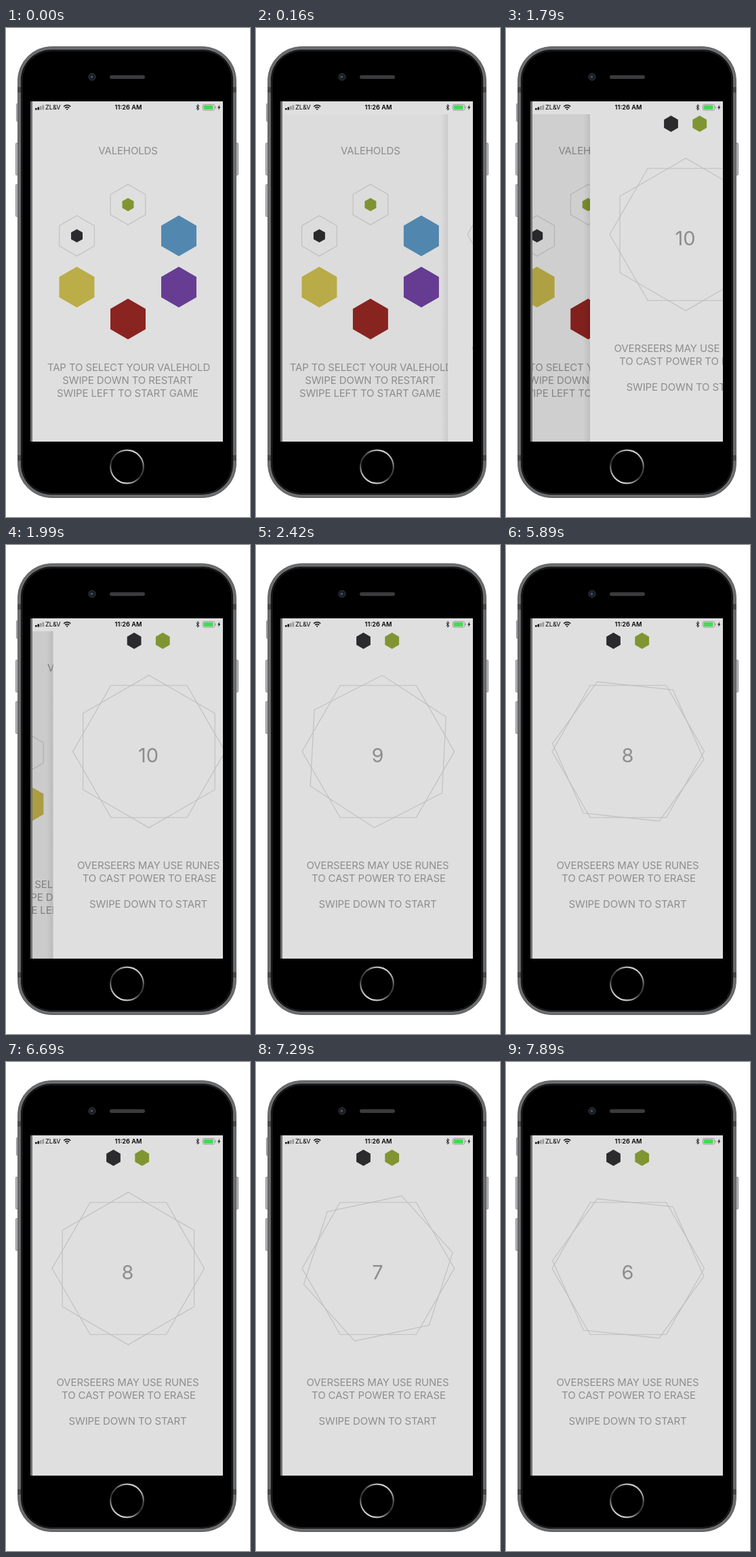
Animation of 360 by 720 pixels, one loop 7990 ms. Source, as an HTML page:

```html
<!DOCTYPE html>
<html lang="en">
<head>
<meta charset="utf-8">
<title>Hex game on a phone</title>
<style>
  html, body { margin: 0; width: 100%; height: 100%; overflow: hidden; background: #fff; }
  svg { display: block; }
  text { font-family: Inter, Roboto, sans-serif; }
  .page text { font-size: 15px; letter-spacing: -.13px; fill: #8d8d8d; text-anchor: middle; }
  .page text.count { font-size: 29px; letter-spacing: 0; }
  .page polygon[fill=none] { stroke: #bebebe; stroke-width: 1.1; }
</style>
</head>
<body>
<svg width="360" height="720" viewBox="0 0 360 720">
  <defs>
    <clipPath id="view"><rect x="39" y="127" width="281" height="482"/></clipPath>
    <linearGradient id="shade"><stop stop-opacity="0"/><stop offset="1" stop-opacity=".08"/></linearGradient>
    <linearGradient id="ring" x1=".75" y1="0" x2=".25" y2="1">
      <stop stop-color="#e4e4e4"/><stop offset=".35" stop-color="#4a4a4a"/>
      <stop offset=".6" stop-color="#333"/><stop offset="1" stop-color="#eee"/>
    </linearGradient>
  </defs>

  <!-- phone -->
  <g fill="#b4b4b6" stroke="#77787a" stroke-width=".8">
    <rect x="15.4" y="111.5" width="5" height="26" rx="1"/>
    <rect x="14.4" y="169.5" width="6" height="47" rx="1"/>
    <rect x="14.4" y="230.5" width="6" height="47" rx="1"/>
    <rect x="336" y="169.5" width="6.6" height="47" rx="1"/>
  </g>
  <rect x="17.5" y="27.5" width="322" height="664" rx="50" fill="#6b6c6e" stroke="#5c5d5f"/>
  <path d="M17 87h5v8h-5zM335 87h5v8h-5zM17 629h5v8h-5zM335 629h5v8h-5z" fill="#48494b"/>
  <rect x="22" y="32" width="313" height="655" rx="45"/>
  <rect x="23.5" y="33.5" width="310" height="652" rx="43.5" stroke="#303133"/>
  <circle cx="127" cy="72" r="5" fill="#17191d" stroke="#3d3f43"/>
  <circle cx="126.5" cy="72" r="2" fill="#37506f"/>
  <rect x="153" y="69.5" width="52" height="5.5" rx="2.7" fill="#3b3b3d"/>
  <circle cx="178.5" cy="646" r="24.3" fill="none" stroke="url(#ring)" stroke-width="2.2"/>
  <rect x="36" y="108" width="284" height="501" fill="#dfdfdf"/>
  <rect x="36" y="108" width="3" height="501" fill="#707070"/>

  <!-- status bar -->
  <path d="M43 118h2.6v2.5H43zM46.5 116.5h2.6v4h-2.6z" fill="#111"/>
  <path d="M50 115h2.6v5.5H50zM53.5 113.5h2.6v7h-2.6z" fill="#999"/>
  <text x="58" y="120.2" font-size="9.2">ZL&amp;V</text>
  <g fill="none" stroke="#111" stroke-width="1.5">
    <path d="M85.2 115.6q5-4.3 10 0M87.2 117.8q3-2.4 6 0"/>
    <path d="M89.2 119.6h2" stroke-width="1.8"/>
    <path d="M280.6 114.6l4.4 4.3-2.2 2.1v-8.3l2.2 2.1-4.4 4.3" stroke-width=".9"/>
  </g>
  <text x="180.5" y="120.2" font-size="9.2" font-weight="600" text-anchor="middle">11:26 AM</text>
  <rect x="290.4" y="112.6" width="17.4" height="8.6" rx="2" fill="none" stroke="#8d8d8d" stroke-width=".8"/>
  <rect x="291.6" y="113.8" width="14" height="6.2" rx="1" fill="#43d957"/>
  <path d="M308.6 115.4h1v3h-1z" fill="#8d8d8d"/>
  <path d="M315.3 112.8l-3.2 4.6h2l-1 3.6 3.3-4.8h-2z" fill="#111"/>

  <g clip-path="url(#view)">
    <g id="menu" class="page">
      <text x="180" y="186">VALEHOLDS</text>
      <text x="181" y="505">TAP TO SELECT YOUR VALEHOLD</text>
      <text x="179.5" y="524.3">SWIPE DOWN TO RESTART</text>
      <text x="179.5" y="543.3">SWIPE LEFT TO START GAME</text>
    </g>
    <rect id="dim" x="39" y="127" width="281" height="482"/>
    <g id="game" class="page">
      <rect x="29" y="127" width="10" height="482" fill="url(#shade)"/>
      <rect x="39" y="127" width="283" height="482" fill="#dfdfdf"/>
      <text id="count" class="count" x="179.5" y="320.3"></text>
      <text x="179.5" y="477">OVERSEERS MAY USE RUNES</text>
      <text x="181" y="496.3">TO CAST POWER TO ERASE</text>
      <text x="179.5" y="533.6">SWIPE DOWN TO START</text>
    </g>
  </g>
</svg>
<script>
const LOOP = 7990, WIDTH = 281, DARK = '#2b2b2d', GREEN = '#809532';
const $ = id => document.getElementById(id);

// Regular hexagon; turn 0 puts a corner at the top
function hexPoints(x, y, r, turn = 0) {
  return Array.from({ length: 6 }, (_, i) => {
    const a = (turn + i * 60) * Math.PI / 180;
    return `${(x + r * Math.sin(a)).toFixed(2)},${(y - r * Math.cos(a)).toFixed(2)}`;
  }).join(' ');
}

function addHex(page, x, y, r, fill = 'none', turn = 0) {
  const hex = document.createElementNS('http://www.w3.org/2000/svg', 'polygon');
  hex.setAttribute('points', hexPoints(x, y, r, turn));
  hex.setAttribute('fill', fill);
  $(page).append(hex);
  return hex;
}

addHex('menu', 180, 260, 29.8);
addHex('menu', 180, 260, 9.8, GREEN);
addHex('menu', 104.5, 306, 29.8);
addHex('menu', 104.5, 306, 9.8, DARK);
addHex('menu', 255, 306, 30, '#5288b0');
addHex('menu', 104.5, 381.5, 30, '#bbad48');
addHex('menu', 255, 381.5, 30, '#663d93');
addHex('menu', 180, 428.5, 30, '#8a2420');

addHex('game', 158.5, 141, 12, DARK);
addHex('game', 200.7, 141, 12, GREEN);
addHex('game', 180.3, 304, 112.3, 'none', 30);
const spinner = addHex('game', 180.3, 304, 112.3);

// How far the game page has slid in
function slide(t) {
  if (t < 30) return 0;
  if (t < 130) return 12;
  if (t < 160) return 28;
  if (t < 1790) return 37;
  const p = Math.min(1, Math.floor((t - 1790) / 100) / 5);
  return WIDTH - 85 * (1 - p) ** 2;
}

// Seconds on the game clock, in tenths
function clock(t) {
  if (t < 2420) return 0;
  if (t < 4890) return .1;
  return (2 + Math.floor((t - 4890) / 100)) / 10;
}

function draw(now) {
  const t = now % LOOP, moved = slide(t), s = clock(t);
  $('menu').setAttribute('transform', `translate(${-moved * .3})`);
  $('dim').setAttribute('opacity', .1 * moved / WIDTH);
  $('game').setAttribute('transform', `translate(${WIDTH - moved})`);
  $('game').setAttribute('visibility', moved ? 'visible' : 'hidden');
  spinner.setAttribute('points', hexPoints(180.3, 304, 112.3, 30 * s));
  $('count').textContent = 9 - Math.floor(s - .05);
}

let start;
function tick(now) {
  start ??= now;
  draw(now - start);
  requestAnimationFrame(tick);
}
draw(0);
requestAnimationFrame(tick);
</script>
</body>
</html>
```
